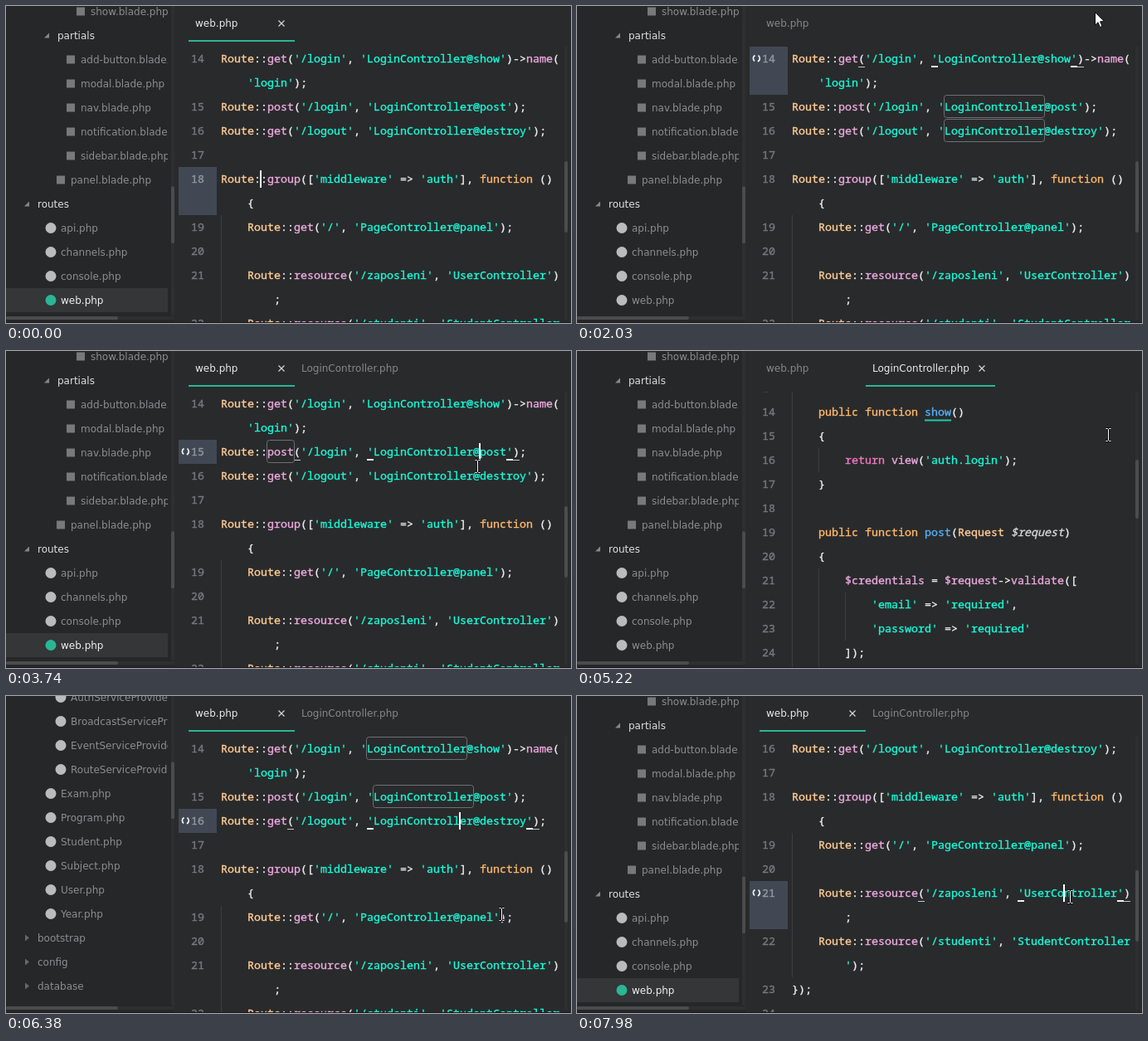
An HTML page that plays this animation: 681 px wide and 382 px high, repeating every 8000 ms.

```html
<!DOCTYPE html>
<html lang="en">
<head>
<meta charset="utf-8">
<title>Code editor</title>
<style>
html, body { margin: 0; width: 100%; height: 100%; overflow: hidden; background: #292a2b; }
svg { display: block; width: 681px; height: 382px; }
.ui { font: 12px "DejaVu Sans", sans-serif; }
.code { font: 500 13.333px "Noto Sans Mono", "DejaVu Sans Mono", monospace; }
.code text { stroke-width: .35px; }
</style>
</head>
<body>
<svg id="stage" viewBox="0 0 681 382">
  <defs>
    <clipPath id="sideClip"><rect width="195" height="373"/></clipPath>
    <clipPath id="codeClip"><rect x="204" y="49" width="470" height="333"/></clipPath>
  </defs>
</svg>
<script>
const LOOP = 8000, ROW = 29, CH = 8, LEFT = 259;
const stage = document.getElementById('stage');

function add(parent, tag, attrs = {}, text) {
  const el = document.createElementNS('http://www.w3.org/2000/svg', tag);
  for (const k in attrs) el.setAttribute(k, attrs[k]);
  if (text !== undefined) el.textContent = text;
  parent.appendChild(el);
  return el;
}
const rect = (p, x, y, width, height, fill, rx = 0) => add(p, 'rect', { x, y, width, height, fill, rx });
const label = (p, x, y, text, fill) => add(p, 'text', { x, y, fill }, text);
const codeText = (p, x, y, text, fill) => add(p, 'text', { x, y: y + 4.5, fill, stroke: fill }, text);
const show = (el, on) => el.setAttribute('display', on ? 'inline' : 'none');
const move = (el, x, y) => el.setAttribute('transform', `translate(${x} ${y})`);
const clamp = v => Math.max(0, Math.min(1, v));
const ease = p => p * p * (3 - 2 * p);
const span = (t, a, b) => clamp((t - a) / (b - a));
const xOf = col => LEFT + col * CH;

rect(stage, 0, 0, 681, 382, '#292a2b');
rect(stage, 0, 0, 203, 382, '#262728');

// ---- sidebar: [kind, depth, name]; kinds: p php, b blade, o open folder, c closed folder
const tree = [];
const files = (kind, depth, names, ext) =>
  names.split(' ').forEach(n => tree.push([kind, depth, n + ext]));
const folder = (kind, depth, names) => files(kind, depth, names, '');
files('p', 4, 'Page Program Student Subject User Year', 'Controller.php');
folder('c', 3, 'Middleware');
files('p', 3, 'Kernel', '.php');
folder('o', 2, 'Providers');
files('p', 3, 'App Auth Broadcast Event Route', 'ServiceProvider.php');
files('p', 2, 'Exam Program Student Subject User Year', '.php');
folder('c', 1, 'bootstrap config database public');
folder('o', 1, 'resources');
folder('c', 2, 'assets lang');
folder('o', 2, 'views');
folder('c', 3, 'auth exams programs students subjects');
folder('o', 3, 'pages');
folder('o', 4, 'users');
files('b', 5, 'create edit index show', '.blade.php');
folder('o', 3, 'partials');
files('b', 4, 'add-button modal nav notification sidebar', '.blade.php');
files('b', 3, 'panel', '.blade.php');
folder('o', 1, 'routes');
files('p', 2, 'api channels console web', '.php');

const SIDE_END = 1106.5;
const sideBox = add(stage, 'g', { class: 'ui', 'clip-path': 'url(#sideClip)' });
const side = add(sideBox, 'g');
const lastY = 11 + (tree.length - 1) * ROW;
const activeRow = rect(side, 0, lastY - 14.5, 195, ROW, '#343637');
let webIcon, webName;
tree.forEach(([kind, depth, name], i) => {
  const y = 11 + i * ROW, x = 12 * depth;
  if (kind === 'o' || kind === 'c') {
    const open = kind === 'o', ax = x + 10;
    add(side, 'path', {
      d: open ? `M${ax + 6} ${y - 3}v6h-6z` : `M${ax + 1} ${y - 4}l5 4l-5 4z`,
      fill: open ? '#85888a' : '#65686a'
    });
    label(side, x + 26, y + 4.5, name, open ? '#dfe0e1' : '#8b8e90');
    return;
  }
  const icon = kind === 'p'
    ? add(side, 'circle', { cx: x + 30, cy: y, r: 6.5, fill: '#b9bbbc' })
    : rect(side, x + 25, y - 5, 10, 10, '#77797b');
  const text = label(side, x + 42, y + 4.5, name, '#8b8e90');
  if (name === 'web.php') { webIcon = icon; webName = text; }
});
rect(stage, 199, 0, 4, 373, '#2e2f30');
rect(stage, 0, 374, 203, 4, '#2e2f30');
rect(stage, 0, 374, 135, 4, '#4b4c4d', 2);
const sideThumb = rect(stage, 199, 0, 4, 69, '#4b4c4d', 2);

// ---- code
const colors = {
  string: '#19f9d8', name: '#ffcc95', keyword: '#ffb86c', flow: '#ef78c0',
  call: '#eca9df', def: '#55b0f9', punct: '#f0f0f0', arg: '#d8d8d8'
};
const TOKEN = /'[^')]*'?|\$\w+|->|=>|::|\w+|[^\s\w]/g;

const lineNumber = (g, num, y, fill) =>
  codeText(g, 239 - CH * String(num).length, y, num, fill);

function codeRow(g, [num, col, src], y) {
  if (num) lineNumber(g, num, y, '#76797d');
  let prev = '';
  const signature = src.startsWith('public');
  for (const m of src.matchAll(TOKEN)) {
    const w = m[0];
    let c = colors.punct;
    if (w[0] === "'") c = colors.string;
    else if (w[0] === '$') c = signature ? colors.arg : colors.call;
    else if (w === 'public' || w === 'function') c = colors.keyword;
    else if (w === 'return' || w === 'if') c = colors.flow;
    else if (/^[A-Z]/.test(w)) c = colors.name;
    else if (/^\w/.test(w)) c = prev === 'function' ? colors.def : colors.call;
    const el = codeText(g, xOf(col + m.index), y, w, c);
    if (c === colors.arg) el.setAttribute('font-style', 'italic');
    prev = w;
  }
}

const webRows = [
  [14, 0, "Route::get('/login', 'LoginController@show')->name("],
  ['', 4, "'login');"],
  [15, 0, "Route::post('/login', 'LoginController@post');"],
  [16, 0, "Route::get('/logout', 'LoginController@destroy');"],
  [17, 0, ''],
  [18, 0, "Route::group(['middleware' => 'auth'], function ()"],
  ['', 4, '{'],
  [19, 4, "Route::get('/', 'PageController@panel');"],
  [20, 0, ''],
  [21, 4, "Route::resource('/zaposleni', 'UserController')"],
  ['', 8, ';'],
  [22, 4, "Route::resource('/studenti', 'StudentController"],
  ['', 8, "');"],
  [23, 0, '});'],
  [24, 0, '']
];
const loginRows = `
    public function __construct()
    {
        $this->middleware('guest')->only('show');
    }

    public function show()
    {
        return view('auth.login');
    }

    public function post(Request $request)
    {
        $credentials = $request->validate([
            'email' => 'required',
            'password' => 'required'
        ]);

        if (! auth()->attempt($credentials)) {
            return back();
        }

        return redirect('/');
    }

    public function destroy()
    {
        auth()->logout();

        return redirect('/login');
    }
}`.split('\n').map((s, i) => [i + 8, s.search(/\S|$/), s.trim()]);

const codeBox = add(stage, 'g', { class: 'code', 'clip-path': 'url(#codeClip)' });

// guides: [column, first row, row count]
function makeView(rows, top, guides) {
  const g = add(codeBox, 'g');
  guides.forEach(([col, a, n]) => rect(g, xOf(col), top + a * ROW - 14.5, 1, n * ROW, '#3c3e40'));
  rows.forEach((r, i) => codeRow(g, r, top + i * ROW));
  return { g, rows, top, marks: add(g, 'g') };
}
const web = makeView(webRows, 63.5, [[0, 7, 6]]);
const login = makeView(loginRows, 41.5,
  [[0, 0, 31], [4, 3, 1], [4, 8, 1], [4, 13, 10], [8, 14, 2], [8, 19, 1], [4, 27, 3]]);

// ---- caret places: lit is a list of [on, fade start]
const line14 = { view: web, row: 0, size: 2, x: 507,
  parens: [10, 43], quotes: [21, 42], boxes: [[2, 23, 15], [3, 23, 15]] };
const line16 = { view: web, row: 3, size: 1, x: 547,
  parens: [10, 47], quotes: [22, 46], boxes: [[0, 22, 15], [2, 23, 15]] };
const places = [
  { view: web, row: 5, size: 2, x: 307, from: 0, to: 740, lit: [[0, 240]] },
  { ...line14, from: 740, to: 2070, lit: [[740, 1590]] },
  { view: login, row: 6, size: 1, x: 451, from: 2070, to: 3000, lit: [[2110, 2430]],
    parens: [20, 21], boxes: [[3, 42, 4]] },
  { ...line14, from: 3000, to: 3640, lit: [[3040, 3640]] },
  { view: web, row: 2, size: 1, x: 571, from: 3640, to: 4300, lit: [[3640, 4160]],
    parens: [11, 44], quotes: [22, 43], boxes: [[2, 7, 4]] },
  { ...line16, from: 4300, to: 5220, lit: [[4300, 4940]] },
  { view: login, row: 25, size: 1, x: 475, from: 5220, to: 6220, lit: [[5260, 5600]],
    parens: [27, 28] },
  { ...line16, from: 6220, to: 7850, lit: [[6260, 6690]] },
  { view: web, row: 9, size: 2, x: 587, from: 7850, to: LOOP, lit: [[7850, LOOP]],
    parens: [19, 50], quotes: [34, 49] }
];
// the bracket columns of a function heading follow its name
places[2].parens = [24, 25];
places.forEach(p => {
  const { view } = p, y = view.top + p.row * ROW;
  p.g = add(view.marks, 'g');
  rect(p.g, 208, y - 14.5, 46, p.size * ROW, '#414854');
  lineNumber(p.g, view.rows[p.row][0], y, '#94989e');
  (p.parens || []).forEach(c => rect(p.g, xOf(c), y + 9.5, CH, 1, '#c4c5c6'));
  (p.quotes || []).forEach(c => rect(p.g, xOf(c), y + 8.5, CH, 2, '#f0f0f0'));
  (p.boxes || []).forEach(([r, c, n]) => add(p.g, 'rect', {
    x: xOf(c) - .5, y: view.top + r * ROW - 14, width: n * CH + 1, height: 27,
    rx: 3, fill: 'none', stroke: '#6c7075'
  }));
  if (p.quotes) add(p.g, 'path', {
    d: `M214.5 ${y - 4}q-4 3 -.5 7M218.5 ${y - 4}q4 4 -.5 7.5`,
    fill: 'none', stroke: '#f4f4f4', 'stroke-width': 1.7
  });
  p.caret = rect(view.g, p.x - 1, y - 10.5, 2, 21, '#ffffff');
});
const oldWord = rect(login.g, xOf(20), login.top + 6 * ROW + 9, 32, 2, '#19c9b0');

// ---- chrome
rect(stage, 673, 49, 4, 329, '#2e2f30');
const thumb = rect(stage, 673, 0, 4, 86, '#4b4c4d', 2);
rect(stage, 0, 381, 681, 1, '#211b23');

function makeTab(x, width, name) {
  const g = add(stage, 'g', { class: 'ui' });
  const text = label(g, x + 8, 25, name, '#fff');
  const on = add(g, 'g');
  const cx = x + width - 16;
  rect(on, x, 41, width, 2, '#2bb596');
  add(on, 'path', { d: `M${cx - 3.5} 17.5l7 7m0 -7l-7 7`, stroke: '#d5d6d7', 'stroke-width': 1.2 });
  return {
    g,
    set(active) {
      show(on, active);
      text.setAttribute('fill', active ? '#e9eaea' : '#85888a');
    }
  };
}
const webTab = makeTab(220, 128, 'web.php');
const loginTab = makeTab(348, 156, 'LoginController.php');

// ---- pointer: [time, x, y]
const arrow = add(stage, 'path', {
  d: 'M.5 .5V16L4 12.7L6.4 18.5L9 17.4L6.6 11.7H11.5Z',
  fill: '#fff', stroke: '#0c0c0c', 'stroke-width': 1
});
const beam = add(stage, 'g', { fill: 'none' });
[['#111', 3], ['#fff', 1]].forEach(([stroke, w]) => add(beam, 'path', {
  d: 'M-2.5 -7.5H-.5L.5 -6.5L1.5 -7.5H3.5M.5 -6.5V6.5M-2.5 7.5H-.5L.5 6.5L1.5 7.5H3.5',
  stroke, 'stroke-width': w
}));
const path = [
  [230, 505, 62], [390, 526, 13], [540, 526, 13], [740, 510, 61], [1220, 510, 61],
  [1300, 624, 7], [2350, 624, 7], [2580, 616, 7], [3280, 616, 7], [3600, 571, 124],
  [3730, 568, 139], [4140, 568, 139], [4290, 549, 153], [4360, 549, 153],
  [4510, 655, 373], [4680, 640, 101], [5580, 640, 101], [5940, 597, 263],
  [7000, 597, 263], [7530, 586, 239], [7870, 586, 239], [7970, 594, 242], [LOOP, 594, 242]
];
function pointerAt(t) {
  const i = path.findIndex(p => p[0] > t);
  if (i < 1) return null;
  const [a, ax, ay] = path[i - 1], [b, bx, by] = path[i];
  const p = ease(span(t, a, b));
  return [ax + (bx - ax) * p, ay + (by - ay) * p];
}

function sideScroll(t) {
  const s = Math.floor((t - 20) / 40) * 40 + 20;
  const up = ease(span(s, 2100, 2340)) + ease(span(s, 5220, 5420));
  const down = ease(span(s, 3060, 3300)) + ease(span(s, 6300, 6534));
  return Math.round(SIDE_END * (1 - up + down) - .5) + .5;
}

function draw(t) {
  const onLogin = (t >= 2070 && t < 3000) || (t >= 5220 && t < 6220);
  const onWeb = !onLogin && !(t >= 2030 && t < 2070);

  const s = sideScroll(t);
  move(side, 0, -s);
  sideThumb.setAttribute('y', 28 + s * .171);
  show(activeRow, onWeb);
  webIcon.setAttribute('fill', onWeb ? '#2bb596' : '#b9bbbc');
  webName.setAttribute('fill', onWeb ? '#f0f0f0' : '#8b8e90');

  webTab.set(onWeb);
  loginTab.set(onLogin);
  show(loginTab.g, t >= 2070);

  const webY = 87 * ease(span(t, 6990, 7530));
  const out = 1 - (1 - span(t, 5260, 5430)) ** 2;
  const loginY = t < 5220 ? 0 : 142 + 409 * out;
  show(web.g, !onLogin);
  show(login.g, onLogin);
  move(web.g, 0, -webY);
  move(login.g, 0, -loginY);
  show(oldWord, t >= 5220);
  thumb.setAttribute('y', onLogin ? 101 + loginY * .211 : 187 + webY * .264);
  thumb.setAttribute('height', onLogin ? 71 : 86);

  places.forEach(p => {
    const here = t >= p.from && t < p.to;
    show(p.g, here);
    const lit = here ? p.lit.find(([on]) => t >= on) : null;
    p.caret.setAttribute('opacity', lit ? 1 - span(t, lit[1], lit[1] + 130) : 0);
  });

  const at = pointerAt(t);
  const onTabs = at && at[1] < 45;
  show(arrow, at && onTabs);
  show(beam, at && !onTabs);
  if (at) move(onTabs ? arrow : beam, Math.round(at[0]), Math.round(at[1]));
}

function tick() {
  draw(performance.now() % LOOP);
  requestAnimationFrame(tick);
}
tick();
</script>
</body>
</html>
```
